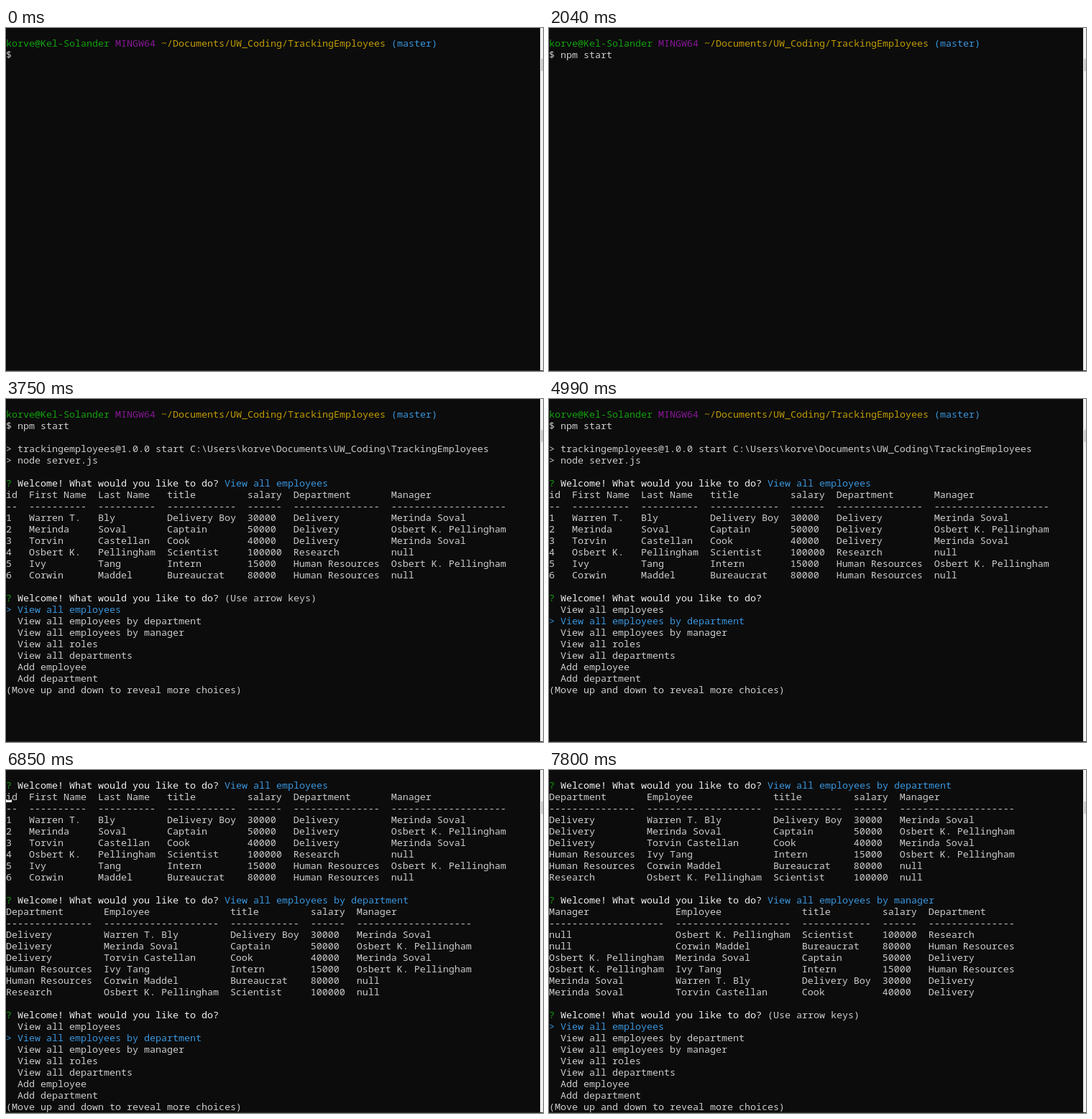
An HTML page for the animation above (8000 ms loop, 747x478 px).

```html
<!DOCTYPE html>
<html lang="en">
<head>
<meta charset="utf-8">
<title>Employee tracker</title>
<style>
  html, body { margin: 0; width: 100%; height: 100%; overflow: hidden; background: #0c0c0c; }
  svg { display: block; width: 747px; height: 478px; }
  text { font: 13.3333px "Noto Sans Mono", "DejaVu Sans Mono", monospace; white-space: pre; }
  #cursor { fill: #fff; mix-blend-mode: difference; }
</style>
</head>
<body>
<svg viewBox="0 0 747 478">
  <rect width="747" height="478" fill="#0c0c0c"/>
  <g id="screen"></g>
  <rect id="cursor" width="8" height="4"/>
  <rect x="743" width="4" height="477" fill="#f0f0f0"/>
  <rect id="thumb" x="744" width="3" height="17" fill="#cdcdcd"/>
  <rect y="477" width="747" height="1" fill="#2f2f2f"/>
</svg>
<script>
const NS = 'http://www.w3.org/2000/svg';
const LOOP = 8000, CELL = 8, ROW = 16, TOP = 13, ROWS = 29;
const GREY = '#cccccc', WHITE = '#f2f2f2', GREEN = '#13a10e',
      PURPLE = '#881798', GOLD = '#c19c00', BLUE = '#3a96dd';

const screen = document.getElementById('screen');
const cursor = document.getElementById('cursor');
const thumb = document.getElementById('thumb');

const USER = 'korve';
const CHOICES = ['View all employees', 'View all employees by department',
  'View all employees by manager', 'View all roles', 'View all departments',
  'Add employee', 'Add department'];

const MERINDA = 'Merinda Soval', OSBERT = 'Osbert K. Pellingham';
const staff = [
  ['Warren T.', 'Bly', 'Delivery Boy', 30000, 'Delivery', MERINDA],
  ['Merinda', 'Soval', 'Captain', 50000, 'Delivery', OSBERT],
  ['Torvin', 'Castellan', 'Cook', 40000, 'Delivery', MERINDA],
  ['Osbert K.', 'Pellingham', 'Scientist', 100000, 'Research', 'null'],
  ['Ivy', 'Tang', 'Intern', 15000, 'Human Resources', OSBERT],
  ['Corwin', 'Maddel', 'Bureaucrat', 80000, 'Human Resources', 'null']
].map(([first, last, title, salary, dept, boss], i) => ({
  id: i + 1, 'First Name': first, 'Last Name': last, Employee: first + ' ' + last,
  title, salary, Department: dept, Manager: boss
}));

// A line is a list of [text, colour] spans.
const plain = s => [[s, GREY]];
const question = (tail, color = GREY) =>
  [['?', GREEN], [' Welcome! What would you like to do? ', WHITE], [tail, color]];

function table(cols, order) {
  const width = c => Math.max(c.length, ...staff.map(p => String(p[c]).length));
  const row = cell => plain(cols.map(c => String(cell(c)).padEnd(width(c))).join('  ').trimEnd());
  return [row(c => c), row(c => '-'.repeat(width(c))),
    ...order.map(id => row(c => staff[id - 1][c])), []];
}

const tables = [
  table(['id', 'First Name', 'Last Name', 'title', 'salary', 'Department', 'Manager'], [1, 2, 3, 4, 5, 6]),
  table(['Department', 'Employee', 'title', 'salary', 'Manager'], [1, 2, 3, 5, 6, 4]),
  table(['Manager', 'Employee', 'title', 'salary', 'Department'], [4, 6, 2, 5, 1, 3])
];

const menu = sel => [
  question(sel ? '' : '(Use arrow keys)'),
  ...CHOICES.map((c, i) => i === sel ? [['> ' + c, BLUE]] : plain('  ' + c)),
  plain('(Move up and down to reveal more choices)')
];

// typed: command so far; cur: cursor cell; done: answered prompts; sel: menu position
const CMD = 'npm start';
const steps = [
  { t: 0, typed: 0 },
  { t: 150, typed: 1, cur: [3, 1] },
  { t: 300, typed: 2, cur: [4, 1] },
  { t: 470, typed: 3 },
  { t: 620, typed: 4, cur: [6, 1] },
  { t: 940, typed: 5, cur: [7, 1] },
  { t: 1090, typed: 6, cur: [8, 1] },
  { t: 1270, typed: 8, cur: [10, 1] },
  { t: 1550, typed: 9 },
  { t: 1720, typed: 9, cur: [0, 2] },
  { t: 2040, typed: 9 },
  { t: 2340, typed: 9, run: true, cur: [0, 6] },
  { t: 2800, done: 0, sel: 0 },
  { t: 3750, done: 1, sel: 0 },
  { t: 4990, done: 1, sel: 1 },
  { t: 5770, done: 2, sel: 0, scroll: 6, cur: [0, 1] },
  { t: 6850, done: 2, sel: 1, scroll: 6, cur: [0, 1] },
  { t: 7020, done: 2, sel: 2, scroll: 6, cur: [0, 1] },
  { t: 7800, done: 3, sel: 0, scroll: 16 }
];

function linesFor({ typed = CMD.length, run, done, sel }) {
  const asking = sel !== undefined;
  const lines = [
    [[USER + '@Kel-Solander ', GREEN], ['MINGW64 ', PURPLE],
      ['~/Documents/UW_Coding/TrackingEmployees ', GOLD], ['(master)', BLUE]],
    plain('$ ' + CMD.slice(0, typed))
  ];
  if (run || asking) lines.push([],
    plain(`> trackingemployees@1.0.0 start C:\\Users\\${USER}\\Documents\\UW_Coding\\TrackingEmployees`),
    plain('> node server.js'), []);
  if (asking) {
    for (let i = 0; i < done; i++) lines.push(question(CHOICES[i], BLUE), ...tables[i]);
    lines.push(...menu(sel));
  }
  return lines;
}

function span(s, color, col, row) {
  const el = document.createElementNS(NS, 'text');
  el.setAttribute('x', col * CELL);
  el.setAttribute('y', TOP + row * ROW + 13);
  el.setAttribute('fill', color);
  el.textContent = s;
  return el;
}

function draw(step) {
  const scroll = step.scroll || 0;
  const parts = [];
  linesFor(step).slice(scroll, scroll + ROWS).forEach((line, row) => {
    let col = 0;
    for (const [s, color] of line) {
      if (s) parts.push(span(s, color, col, row));
      col += s.length;
    }
  });
  screen.replaceChildren(...parts);
  const [col, row] = step.cur || [0, 0];
  cursor.setAttribute('visibility', step.cur ? 'visible' : 'hidden');
  cursor.setAttribute('x', col * CELL);
  cursor.setAttribute('y', TOP + row * ROW + 12);
  thumb.setAttribute('y', scroll ? 44 : 43);
}

let shown;
const start = performance.now();
function tick() {
  const t = (performance.now() - start) % LOOP;
  const step = steps.findLast(s => s.t <= t);
  if (step !== shown) draw(shown = step);
  requestAnimationFrame(tick);
}
tick();
</script>
</body>
</html>
```
